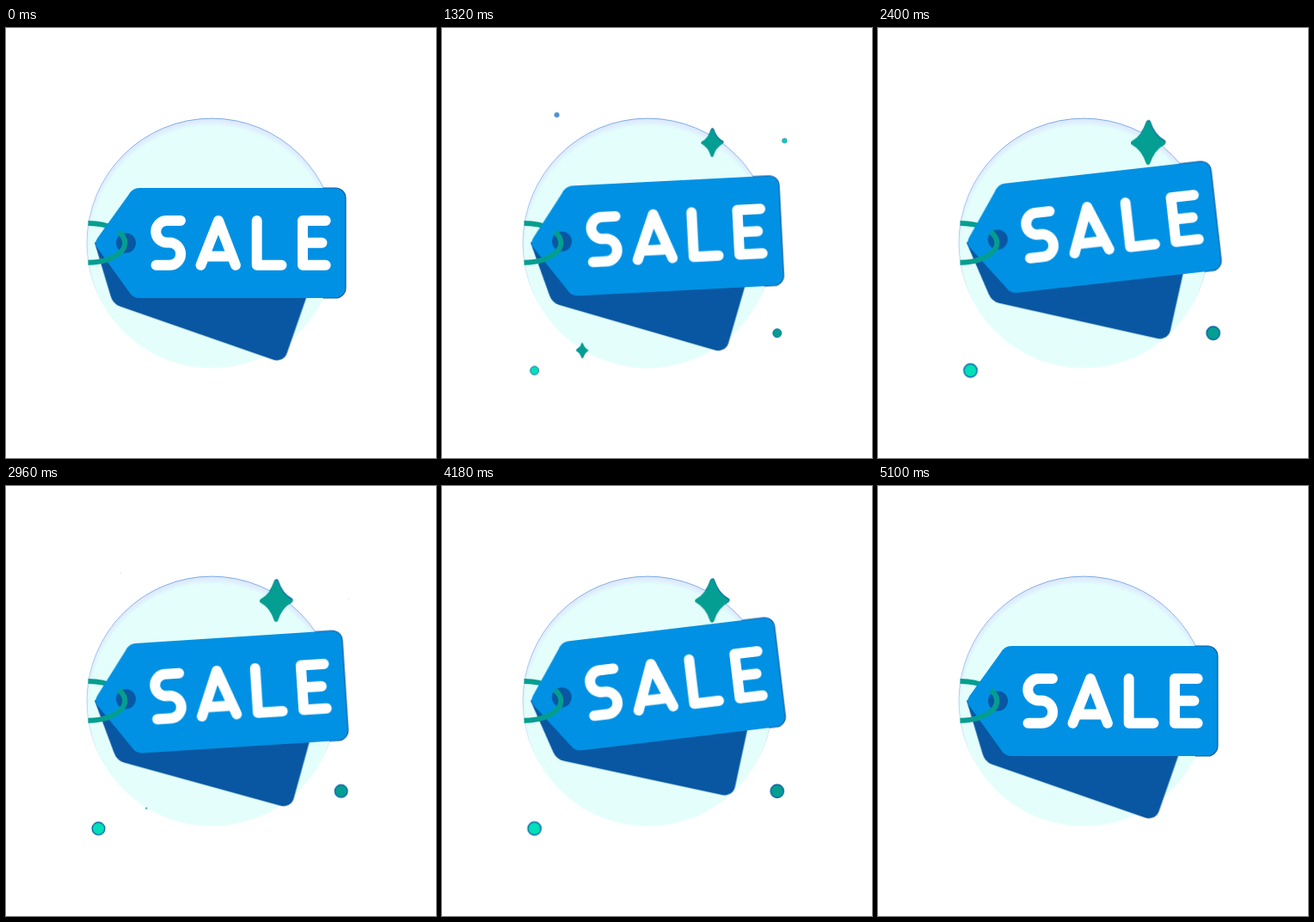
An HTML page without scripts that plays this animation: 500x500 px, repeating every 5120 ms.

```html
<!DOCTYPE html>
<html lang="en">
<head>
<meta charset="utf-8">
<title>Sale tag</title>
<style>
html, body { margin: 0; width: 100%; height: 100%; overflow: hidden; background: #fff; }
svg { display: block; width: 100vw; height: 100vh; }

.front, .back {
  transform-origin: 104px 250px;
  animation: swing 5.12s cubic-bezier(.333, 0, .667, 1) infinite;
}
.front { --tilt: -7deg; }
.back { --tilt: -7.2deg; }

.early, .late {
  transform: scale(0);
  animation: pulse 5.12s cubic-bezier(.333, 0, .667, 1) infinite backwards;
}
.late { animation-delay: .3s; }

.spark circle { stroke: #0a62a8; stroke-width: 1.4; }
.star { fill: #049e92; stroke: #049e92; }
.shade { fill: #0a5aa4; stroke: #0a5aa4; }
.edge { fill: none; stroke: #0a5aa4; stroke-width: 1.2; }
.cord { fill: none; stroke: #049e90; stroke-width: 6; }
.letters { fill: none; stroke: #fff; stroke-width: 11.9; stroke-linecap: round; stroke-linejoin: round; }

/* three swings of 1.7s, then a 20ms rest */
@keyframes swing {
  0%, 33.203%, 66.406%, 99.609%, 100% { transform: rotate(0deg); }
  16.602%, 49.805%, 83.008% { transform: rotate(var(--tilt)); }
}

/* eight pulses of 0.6s, then a pause */
@keyframes pulse {
  0%, 11.719%, 23.438%, 35.156%, 46.875%, 58.594%, 70.313%, 82.031%, 93.75%, 100% { transform: scale(0); }
  5.859%, 17.578%, 29.297%, 41.016%, 52.734%, 64.453%, 76.172%, 87.891% { transform: scale(1); }
}
</style>
</head>
<body>
<svg viewBox="0 0 500 500" role="img" aria-label="SALE">
  <defs>
    <radialGradient id="disc" cx=".5" cy=".52" r=".51">
      <stop offset=".955" stop-color="#e4fffb"/>
      <stop offset="1" stop-color="#deebff"/>
    </radialGradient>
    <linearGradient id="rim" x2="0" y2="1">
      <stop offset="0" stop-color="#5b95da" stop-opacity=".8"/>
      <stop offset=".5" stop-color="#7fa8e2" stop-opacity=".5"/>
      <stop offset=".75" stop-color="#7fa8e2" stop-opacity="0"/>
    </linearGradient>
    <clipPath id="outside">
      <path clip-rule="evenodd" d="M0 0H500V500H0ZM94 250a145 145 0 0 0 290 0a145 145 0 0 0 -290 0Z"/>
    </clipPath>
    <path id="tag" d="M155 186H383a12 12 0 0 1 12 12V302a12 12 0 0 1 -12 12H155Q147 314 142.500 306L106.500 256A10 10 0 0 1 106.500 244L142.500 194Q147 186 155 186Z"/>
    <path id="star" stroke-width="5" stroke-linejoin="round" d="M0 -23Q5 -7 17.500 0Q5 7 0 23Q-5 7 -17.500 0Q-5 -7 0 -23Z"/>
  </defs>

  <circle cx="239.200" cy="250.300" r="145.200" fill="url(#disc)"/>
  <circle cx="239.200" cy="250.300" r="145.200" fill="none" stroke="url(#rim)"/>

  <g class="back">
    <path transform="translate(104 250) rotate(19.200)" fill="#0957a2"
      d="M-1 0L37 52.500Q42.600 60.200 51 60.200H240a12.500 12.500 0 0 0 12.500 -12.500V-40H28Z"/>
  </g>

  <path class="cord" d="M95.500 226.900A43.500 22.900 0 0 1 139 249.800"/>

  <g class="front">
    <use href="#tag" fill="#0091e4"/>
    <circle cx="139.500" cy="250" r="11.500" fill="#0957a2"/>
    <g class="letters">
      <path d="M203 224H187a12.750 12.750 0 0 0 0 25.500h3a13 13 0 0 1 0 26.300H174.500"/>
      <path d="M226.500 275.800L247 224L267 275.800M231 265.500H263"/>
      <path d="M291.700 224V275.800H320.500"/>
      <path d="M371.700 224H345V275.800H371.700M345 249.800H367.500"/>
    </g>
  </g>
  <g clip-path="url(#outside)">
    <g class="front"><use href="#tag" class="edge"/></g>
  </g>

  <path class="cord" d="M131 237.100A43.500 22.900 0 0 1 95.500 272.700"/>

  <g class="spark">
    <g transform="translate(133.500 101)"><circle class="early" r="7.500" fill="#4f93d8"/></g>
    <g transform="translate(398.300 131)"><circle class="early" r="7.800" fill="#00d3b8"/></g>
    <g transform="translate(107.500 398.300)"><circle class="late" r="7.700" fill="#00dfb9"/></g>
    <g transform="translate(389.700 354.800)"><circle class="late" r="7.700" fill="#049e92"/></g>
  </g>

  <g clip-path="url(#outside)">
    <g transform="translate(314.500 132.600)"><g class="late"><use href="#star" class="shade"/></g></g>
    <g transform="translate(163.500 374.200)"><g class="early"><use href="#star" class="shade"/></g></g>
  </g>
  <g transform="translate(314 133.500)"><g class="late"><use href="#star" class="star"/></g></g>
  <g transform="translate(163 375)"><g class="early"><use href="#star" class="star"/></g></g>
</svg>
</body>
</html>
```
